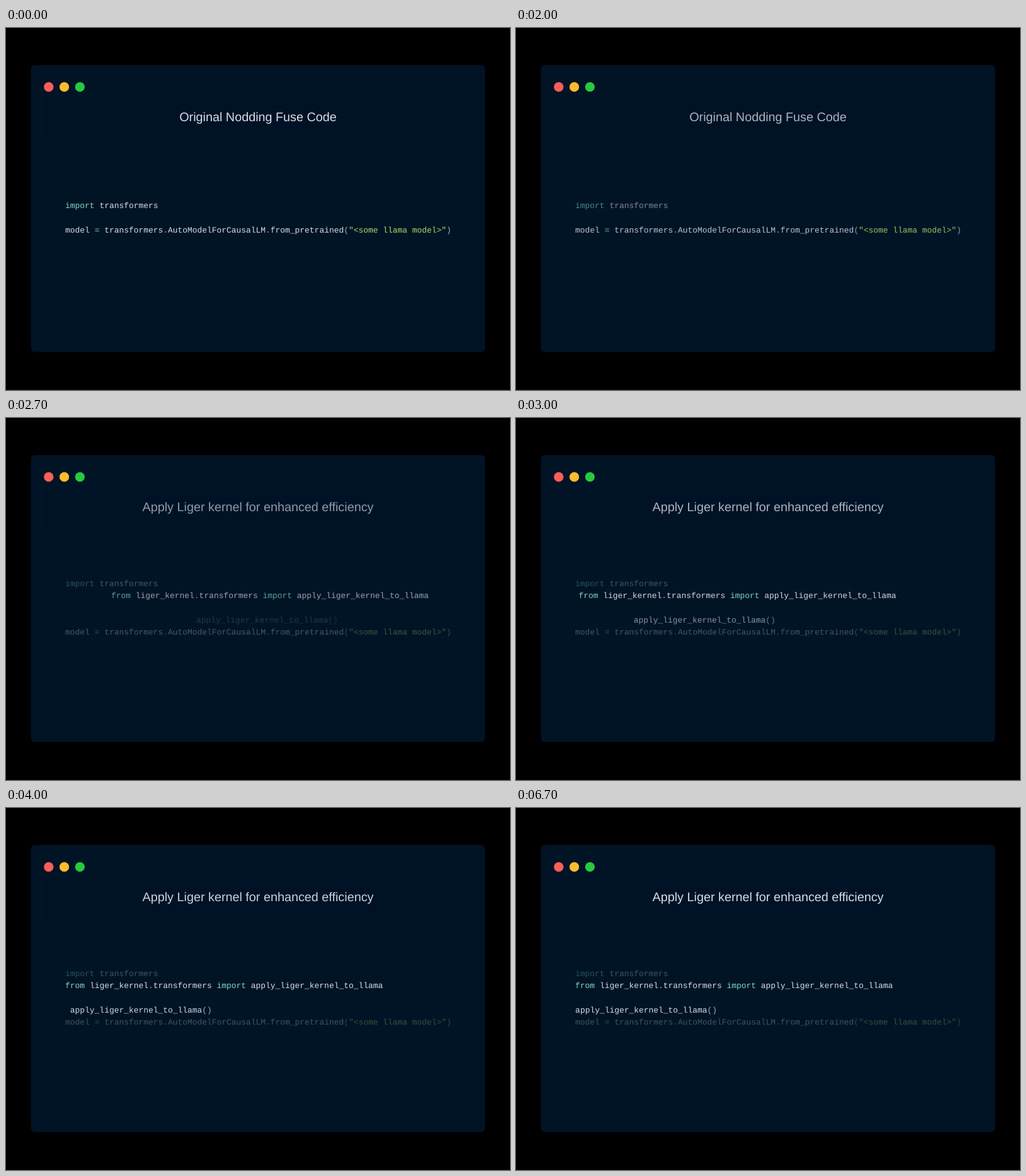
Animation, 800 px wide and 575 px high, one loop 6.8 s. Source, as an HTML page:

```html
<!DOCTYPE html>
<html lang="en">
<head>
<meta charset="utf-8">
<title>Code walkthrough</title>
<style>
  html, body { margin: 0; width: 100%; height: 100%; overflow: hidden; background: #000; }
  svg { display: block; width: 800px; height: 575px; }
  text { fill: #d6deeb; white-space: pre; text-rendering: geometricPrecision; }
  .title { font: 19.8px "Liberation Sans", Arial, sans-serif; text-anchor: middle; }
  .code { font: 12.93px "Liberation Mono", "Courier New", monospace; }
  .k { fill: #7fdbca; }
  .s { fill: #addb67; }
  .p { fill: #9fb2c6; }
</style>
</head>
<body>
<svg viewBox="0 0 800 575">
  <rect width="800" height="575"/>
  <rect y="574" width="800" height="1" fill="#07070f"/>
  <rect x="39.7" y="59" width="720.6" height="455.5" rx="6" fill="#001426"/>
  <rect x="60" y="109" width="680" height="68" fill="#001225"/>
  <circle cx="67.8" cy="93.7" r="7.6" fill="#ff5f56"/>
  <circle cx="92.5" cy="93.7" r="7.6" fill="#ffbd2e"/>
  <circle cx="117.3" cy="93.7" r="7.6" fill="#27c93f"/>
  <text id="before" class="title" x="400" y="148">Original Nodding Fuse Code</text>
  <text id="after" class="title" x="400" y="148">Apply Liger kernel for enhanced efficiency</text>
  <g class="code">
    <text id="imports"><tspan class="k">import</tspan> transformers</text>
    <text id="from"><tspan class="k">from</tspan> liger_kernel<tspan class="p">.</tspan>transformers <tspan class="k">import</tspan> apply_liger_kernel_to_llama</text>
    <text id="apply">apply_liger_kernel_to_llama<tspan class="p">()</tspan></text>
    <text id="model">model <tspan class="k">=</tspan> transformers<tspan class="p">.</tspan>AutoModelForCausalLM<tspan class="p">.</tspan>from_pretrained<tspan class="p">(</tspan><tspan class="s">"&lt;some llama model&gt;"</tspan><tspan class="p">)</tspan></text>
  </g>
</svg>
<script>
const LOOP = 6800, STEP = 100, START = 2000;
const LEFT = 94.1, MIDDLE = 305.4, LINE = 19.4, SLIDE = 250;
const get = id => document.getElementById(id);
const clamp = v => Math.min(1, Math.max(0, v));
const ease = u => u < 0.5 ? 2 * u * u : 1 - 2 * (1 - u) ** 2;
const tween = (p, from, to) => ease(clamp((p - from) / (to - from)));

// Share of the transition still to go: a quick start and a long tail.
function remaining(ms) {
  const s = (ms - START) / 1000;
  return s < 0 ? 1 : 0.248 * Math.exp(-1.08 * s) + 0.652 * Math.exp(-3.7 * s);
}

function place(id, row, shift, opacity) {
  const el = get(id);
  el.setAttribute("transform", `translate(${LEFT + shift} ${MIDDLE + row * LINE})`);
  el.setAttribute("opacity", opacity);
}

function draw(ms) {
  const q = remaining(ms), p = 1 - q;
  get("before").setAttribute("opacity", clamp(1 - 2 * p));
  get("after").setAttribute("opacity", clamp(2 * p - 1));

  const dim = power => 0.3 + 0.7 * (0.8 * q ** power + 0.2 * q);
  const row = 1 + tween(p, 0.15, 0.8);
  place("imports", -row, 0, dim(12));
  place("model", row, 0, dim(2));

  const enter = (id, row, from, to) => {
    const e = tween(p, from, to);
    place(id, row, SLIDE * (1 - e), e);
  };
  enter("from", -1, 0.69, 0.924);
  enter("apply", 1, 0.767, 1);
}

function tick() {
  const ms = performance.now() % LOOP;
  draw(Math.floor(ms / STEP) * STEP);
  requestAnimationFrame(tick);
}
tick();
</script>
</body>
</html>
```
